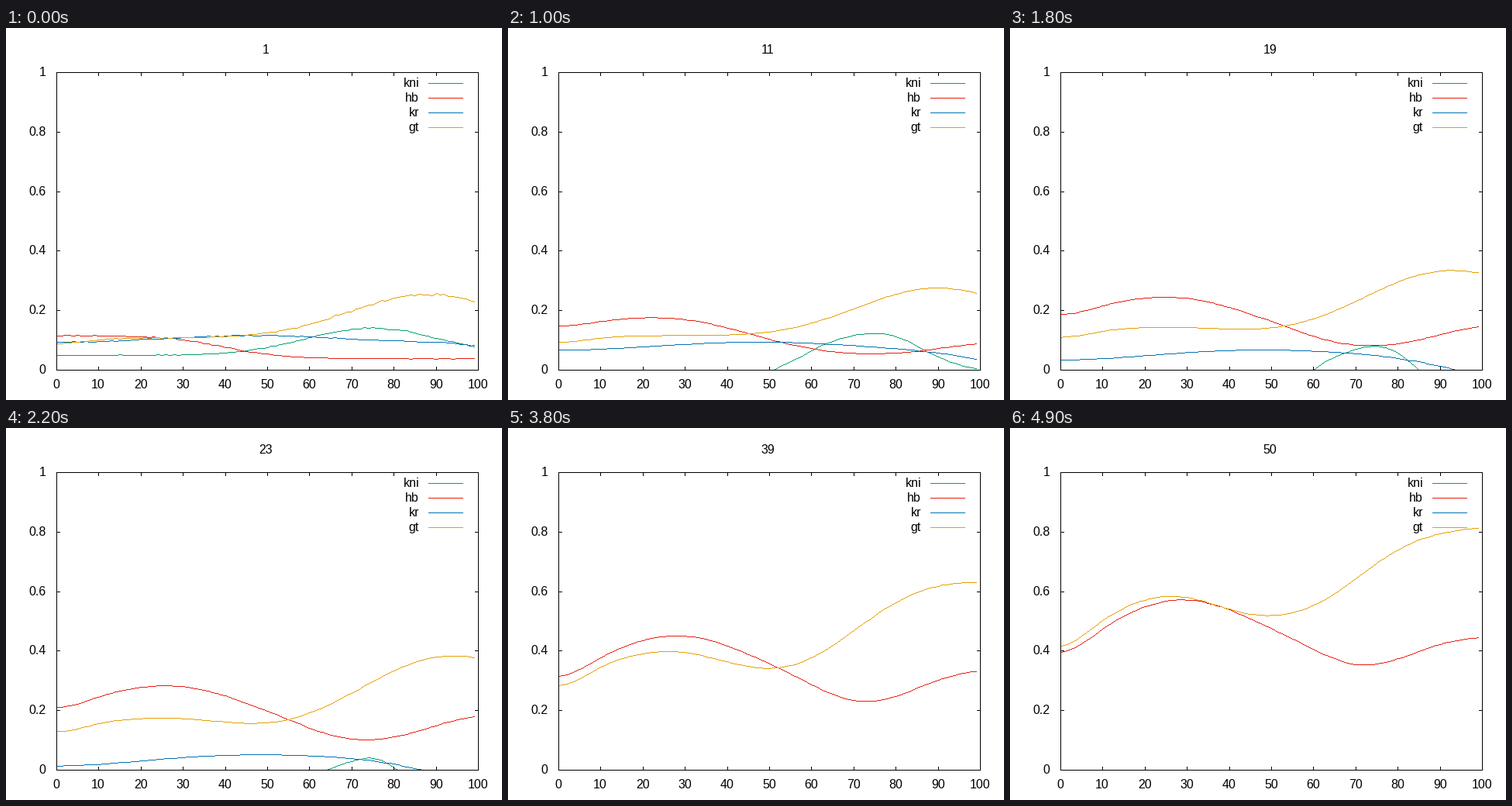
A matplotlib script that plays this animation: 640 by 480 pixels, repeating every 5 s.

```python
import numpy as np
import matplotlib.pyplot as plt
from matplotlib.animation import FuncAnimation

FRAMES, INTERVAL = 50, 100
LEFT, TOP, RIGHT, BOTTOM = 65, 57, 609, 441
X = np.arange(100)


def bump(centre, width, height):
    return height * np.exp(-((X - centre) / width) ** 2)


def step(centre, width, height):
    return height / (1 + np.exp((centre - X) / width))


# name, colour, first level, last level, onset of change, softness of onset.
# A level below zero means that the gene has died out.
GENES = [
    ("kni", "#009e73",
     0.050 + bump(75, 22.5, 0.091),
     -0.95 + step(49, 1.5, 0.33) + bump(63, 8, 0.28) + bump(0, 9, 0.43),
     8 + bump(75, 11.5, 18), 7),
    ("hb", "#e51e10",
     0.116 + step(40, 7, -0.078),
     0.45 + bump(29, 20, 0.122) + bump(72, 16, -0.098) + bump(0, 10, -0.07),
     1 + bump(0, 11, 7.5) + bump(74, 21, 24.5), 10),
    ("kr", "#0072b2",
     0.092 + bump(47, 28, 0.024) + bump(103, 8, -0.014),
     -0.08 + bump(0, 24, -0.07) + bump(107, 22, -0.28),
     10, 10),
    ("gt", "#e69f00",
     0.108 + bump(88, 26, 0.148) + bump(0, 10, -0.018),
     0.483 + step(71, 8, 0.34) + bump(26, 17, 0.10) + bump(0, 9, -0.075),
     22 + bump(54, 15, 4.7) + step(83, 7, -8) + bump(0, 8, 1.5), 5),
]
ROUGHNESS = np.random.default_rng(4).normal(0, 0.008, (len(GENES), len(X)))


def progress(now, onset, softness):
    """Share of the change done: slow before the onset, steady after it."""
    def ramp(t):
        return np.logaddexp(0, (t - onset) / softness)
    return (ramp(now) - ramp(1)) / (ramp(FRAMES) - ramp(1))


def px(x):
    return np.floor(LEFT + (RIGHT - LEFT) * np.asarray(x) / 100 + 0.5)


def py(y):
    return np.floor(BOTTOM - (BOTTOM - TOP) * np.asarray(y) + 0.5)


fig = plt.figure(figsize=(6.4, 4.8), dpi=100, facecolor="white")
ax = fig.add_axes([0, 0, 1, 1])
ax.set(xlim=(0, 640), ylim=(480, 0))
ax.axis("off")


def line(xs, ys, color="black", z=5):
    """One-pixel line through the centres of the given pixels."""
    ax.plot(np.add(xs, 0.5), np.add(ys, 0.5), color=color, lw=0.72, zorder=z,
            snap=False, solid_capstyle="projecting", solid_joinstyle="miter")


def label(x, y, text, align):
    return ax.text(x, y, text, ha=align, va="baseline", fontsize=11.52,
                   family="Liberation Sans", color="black", zorder=6)


line([LEFT, RIGHT, RIGHT, LEFT, LEFT], [BOTTOM, BOTTOM, TOP, TOP, BOTTOM])
for value in range(0, 101, 10):
    x = px(value)
    line([x, x], [BOTTOM, BOTTOM - 4])
    line([x, x], [TOP, TOP + 4])
    label(x, 465, str(value), "center")
for tenth in range(0, 11, 2):
    y = py(tenth / 10)
    line([LEFT, LEFT + 4], [y, y])
    line([RIGHT, RIGHT - 4], [y, y])
    label(51.5, y + 5, f"{tenth / 10:g}", "right")

# Each curve is a staircase, one pixel high in every column.
columns = np.arange(LEFT, px(X[-1]) + 1)
edges = np.append(columns, columns[-1] + 1)
curves = []
for row, (name, color, *_) in enumerate(GENES):
    y = 71 + 19 * row
    label(533, y + 5, name, "right")
    line([545, 589], [y, y], color, 2)
    curves.append(ax.stairs(columns * 0 + 1, edges, baseline=columns * 0,
                            fill=True, facecolor=color, lw=0, zorder=3))
title = label(335.5, 33, "", "center")


def draw(frame):
    now = frame + 1
    title.set_text(str(now))
    fade = np.exp(-frame / 2.5)
    for curve, gene, rough in zip(curves, GENES, ROUGHNESS):
        first, last, onset, softness = gene[2:]
        level = first + (last - first) * progress(now, onset, softness)
        level = np.maximum(level * (1 + rough * fade), 0)
        rows = np.floor(np.interp(columns, px(X), py(level)) + 0.5)
        curve.set_data(values=rows + 1, baseline=rows)
    return [*curves, title]


animation = FuncAnimation(fig, draw, frames=FRAMES, interval=INTERVAL,
                          repeat=True, repeat_delay=0)
plt.show()
```
